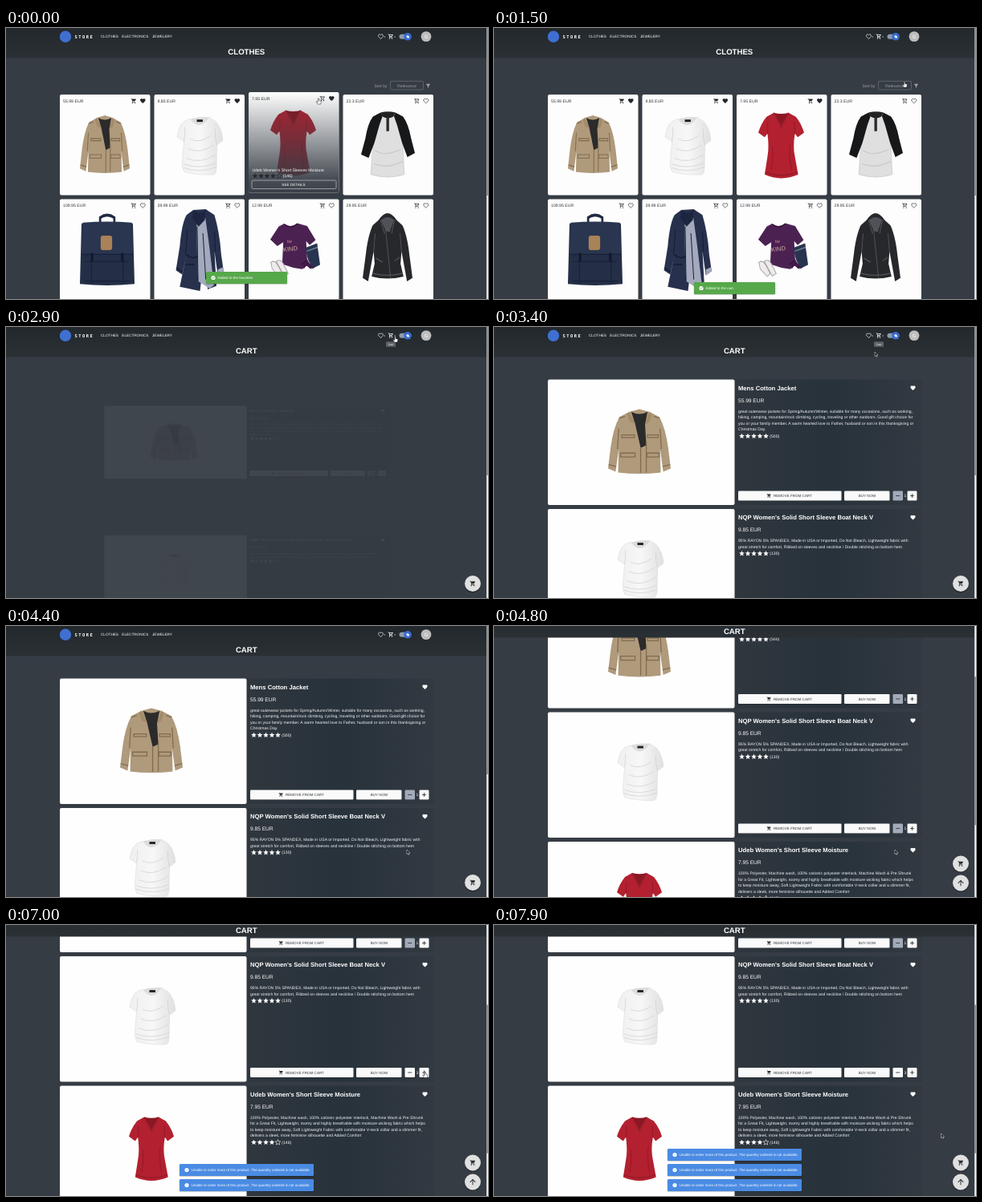
An HTML page for the animation above (8 s loop, 600x338 px).

```html
<!DOCTYPE html>
<html lang="en">
<head>
<meta charset="utf-8">
<title>Store</title>
<style>
html, body { margin: 0; width: 100%; height: 100%; overflow: hidden; background: #363c44; }
svg { display: block; width: 100%; height: 100%; }
text { font-family: "Liberation Sans", Arial, sans-serif; text-rendering: geometricPrecision; white-space: pre; }
.brand { font-family: "DejaVu Sans Mono", monospace; font-weight: 700; letter-spacing: 1.45px; }
.bold { font-weight: 700; }
.mid { text-anchor: middle; }
</style>
</head>
<body>
<svg id="stage" viewBox="0 0 600 338" preserveAspectRatio="none"></svg>
<script>
const LOOP = 8000, DARK = '#25282c', PITCH = 161.5;
const wheels = 'M7 18a2 2 0 1 0 0 4 2 2 0 0 0 0-4zM17 18a2 2 0 1 0 0 4 2 2 0 0 0 0-4z';
const icons = {
  cart: 'M1 2v2h2l3.6 7.6-1.4 2.4C4.5 15.4 5.5 17 7 17h12v-2H7l1.1-2h7.5c.7 0 1.4-.4 1.7-1L20.9 5.5A1 1 0 0 0 20 4H5.2l-.9-2z' + wheels,
  cartLine: 'M15.5 13c.8 0 1.4-.4 1.8-1L20.9 5.5A1 1 0 0 0 20 4H5.2l-.9-2H1v2h2l3.6 7.6-1.4 2.4C4.5 15.4 5.5 17 7 17h12v-2H7l1.1-2zM6.2 6h12.1l-2.8 5h-7z' + wheels,
  heart: 'M12 21.3l-1.5-1.3C5.4 15.4 2 12.3 2 8.5 2 5.4 4.4 3 7.5 3c1.7 0 3.4.8 4.5 2.1C13.1 3.8 14.8 3 16.5 3 19.6 3 22 5.4 22 8.5c0 3.8-3.4 6.9-8.5 11.5z',
  star: 'M12 17.3L18.2 21l-1.7-7L22 9.2l-7.2-.6L12 2 9.2 8.6 2 9.2 7.5 14l-1.7 7z',
  filter: 'M4 4h16v2l-6 7v8l-4-3v-5L4 6z',
  up: 'M4 12l1.4 1.4L11 7.8V20h2V7.8l5.6 5.6L20 12l-8-8z',
  check: 'M12 2a10 10 0 1 0 0 20 10 10 0 0 0 0-20zM10 17l-5-5 1.4-1.4L10 14.2l7.6-7.6L19 8z',
  info: 'M12 2a10 10 0 1 0 0 20 10 10 0 0 0 0-20zM11 7h2v2h-2zM11 11h2v6h-2z'
};

const path = (d, fill, more = '') => `<path d="${d}" fill="${fill}" ${more}/>`;
const line = (d, color, w) => path(d, 'none', `stroke="${color}" stroke-width="${w}"`);
const rect = (x, y, w, h, fill, rx = 0, more = '') =>
  `<rect x="${x}" y="${y}" width="${w}" height="${h}" fill="${fill}" rx="${rx}" ${more}/>`;
const disc = (x, y, r, fill) => `<circle cx="${x}" cy="${y}" r="${r}" fill="${fill}"/>`;
const text = (x, y, size, fill, s, cls = '', more = '') =>
  `<text x="${x}" y="${y}" font-size="${size}" fill="${fill}" class="${cls}" ${more}>${s}</text>`;
const group = (body, more = '') => `<g ${more}>${body}</g>`;
const icon = (name, x, y, size, fill, more = '') => path(icons[name], fill,
  `fill-rule="evenodd" transform="translate(${x} ${y}) scale(${size / 24}) translate(-12 -12)" ${more}`);
const heartLine = (x, y, color) => icon('heart', x, y, 7.2, 'none', `stroke="${color}" stroke-width="2.3"`);
const fade = (id, stops, dir = 'x2="0" y2="1"') => `<linearGradient id="${id}" ${dir}>` +
  stops.map(([at, color, alpha = 1]) => `<stop offset="${at}" stop-color="${color}" stop-opacity="${alpha}"/>`).join('') +
  '</linearGradient>';

// Garments, each drawn in a 100 by 100 box
const goods = {
  jacket: path('M34 4L50 0 66 4 82 12Q92 30 96 60L100 92 88 97 83 62 84 98Q50 102 16 98L17 62 12 97 0 92 4 60Q8 30 18 12Z', '#b09a7c') +
    path('M37 4Q50 11 63 4L59 24 61 56 52 60 43 22Z', '#2c2b2b') +
    path('M34 4L43 22 35 20 30 8ZM66 4L59 24 66 20 70 8Z', '#a38b69') +
    line('M52 60V98M61 50V98M17 30L15 62M83 30L85 62M22 40H42V44H22ZM63 40H80V44H63ZM20 68H43V74H20ZM62 68H81V74H62ZM1 86L13 89M99 86L87 89M18 14L27 11M82 14L73 11', '#816b4d', 1.6),
  blouse: path('M28 6Q48 26 70 3L84 10Q98 22 100 42L87 50 86 86Q86 98 80 100 45 101 15 95L11 84 15 44 0 36Q4 14 18 9Z', 'url(#cloth)', 'stroke="#dedede" stroke-width="1"') +
    path('M29 6Q48 2 70 3 50 28 29 6', '#dcdcdc') + rect(43, 7, 13, 4, '#222') +
    line('M15 44Q18 30 17 20M87 50Q82 36 83 22M14 82Q48 92 86 80M13 88Q50 98 86 87M20 72Q50 83 84 66M28 40Q50 48 74 34M24 56Q50 66 80 50', '#d2d2d2', 1.2),
  tee: path('M34 2L50 23 66 2 82 8Q94 18 100 32L86 39 80 33Q75 54 80 68L87 95Q50 106 14 95L20 68Q24 54 20 33L14 39 0 32Q6 18 18 8Z', '#b3202f') +
    path('M34 2Q50 5 66 2L50 23Z', '#8c1723') +
    line('M34 2L50 24 66 2M20 34L21 16M80 34L79 16M15 91Q50 101 86 91M30 52Q34 70 28 88M70 48Q66 70 73 88', '#92192a', 1.6),
  raglan: path('M36 5L64 5 77 40 80 96Q50 104 18 96L23 40Z', '#dfdfe0', 'stroke="#c8c8c8"') +
    path('M36 3L22 9Q12 20 8 42L0 66 14 71 25 48 34 22 40 8ZM64 3L78 9Q88 20 93 42L100 64 86 70 76 48 67 22 61 8Z', '#17181a') +
    path('M36 3Q50 0 64 3L60 9Q50 14 40 9Z', '#222') + rect(47, 10, 5, 21, '#2a2a2c') +
    line('M26 60Q45 70 74 58M24 80Q50 88 78 76', '#cacacc', 1.5),
  backpack: line('M37 14V5Q50 -2 63 5V14', '#202b44', 4) +
    path('M3 13H97L100 97Q50 101 0 97Z', '#242f47') +
    path('M5 12Q50 9 95 12L97 55H3Z', '#2a3650') + rect(38, 30, 21, 20, '#a98257', 3) +
    line('M3 56H97M21 56V97M79 56V97M10 66H90M8 93H92', '#18213a', 1.6) +
    path('M20 54h5v12h-5zM75 54h5v12h-5z', '#141b2e'),
  coat: path('M36 2L62 1 80 8Q91 30 94 56L99 76 87 81 80 52 84 94 66 98 58 60 50 100 8 95 22 56 13 80 0 75 8 46Q12 18 22 8Z', '#27304c') +
    path('M43 15L61 11 68 40 79 93 70 97 46 88 44 56Z', '#a4a9bd') + path('M36 2Q50 9 62 1L60 14 47 22 34 12Z', '#1d2540') +
    line('M22 56Q34 62 45 58M24 26L20 56M80 28L82 52M20 68H38M44 22L46 88M1 72L14 77M56 30L62 86', '#151c34', 1.6) + path('M87 74L98 71 99 76 87 81Z', '#a4a9bd'),
  knot: path('M28 3Q41 12 54 2L74 7 91 32 79 41 72 34 74 66 84 84 72 78 64 84Q44 82 24 75L26 36 14 43 0 31 17 8Z', '#4b2152') +
    line('M28 4Q41 14 54 3M73 68L62 76', '#371139', 2) +
    path('M70 46L94 38 100 76 85 83 76 68Z', '#28334f') + line('M73 52L95 45', '#77819a', 2) +
    path('M1 72Q10 66 17 80L24 92 18 97 4 84ZM12 70Q22 64 28 78L36 92 28 96Z', '#efebeb', 'stroke="#a9a4a8" stroke-width="1.5"') +
    path('M73 68L88 82 79 83 74 76 67 84 66 74Z', '#41194a'),
  leather: path('M32 10Q50 -10 68 10L80 18Q90 34 94 62L100 95 89 100 78 56 76 74 82 93Q50 99 18 93L24 74 22 56 11 100 0 95 6 62Q10 34 20 18Z', '#27282b') +
    path('M37 10Q50 2 63 10L54 28 46 26Z', '#515257') +
    line('M46 24L56 95M36 10L44 30M64 10L58 30M27 66L40 72M64 70L74 65M22 56L25 30M78 56L75 30M20 88Q50 94 80 88', '#54555a', 1.5)
};
const place = (name, x, y, w, h) => group(goods[name], `transform="translate(${x} ${y}) scale(${w / 100} ${h / 100})"`);

function stars(x, y, n, votes, fill) {
  let s = '';
  for (let i = 0; i < 5; i++)
    s += icon('star', x + 4 + i * 7.5, y, 8, i < n ? fill : 'none', `stroke="${fill}" stroke-width="${i < n ? 0 : 1.8}"`);
  return s + text(x + 38.8, y + 1.7, 5.1, '#fff', `(${votes})`);
}

// Shop page: name, x, y, w, h, price, chosen
const shelf = [
  ['jacket', 92, 109, 62, 72, '55.99', 1], ['blouse', 213, 109, 57, 74, '9.85', 1],
  ['tee', 329, 104, 57, 83, '7.95', 1], ['raglan', 442, 103, 67, 83, '22.3', 0],
  ['backpack', 92, 232, 68, 90, '109.95', 0], ['coat', 211.5, 225, 60, 103, '39.99', 0],
  ['knot', 329, 242, 62, 70, '12.99', 0], ['leather', 444, 231, 62, 85, '29.95', 0]
];
const hover = group(
  rect(302, 83, 112.5, 125.5, 'url(#shade)', 2) +
  text(306.5, 182, 5.15, '#fff', "Udeb Women's Short Sleeves Moisture") +
  stars(306, 187.5, 4, 146, DARK) +
  rect(306, 193, 105, 10.5, 'none', 1.5, 'stroke="#d5d7d9" stroke-width=".6"') +
  text(358, 200, 4.6, '#fff', 'SEE DETAILS', 'mid'), 'id="hover"');
const cards = shelf.map(([name, x, y, w, h, price, chosen], i) => {
  const left = 67 + (i % 4) * 117.5, top = i < 4 ? 83 : 213.5, cy = top + 8, hot = i == 2;
  return group(rect(left, top, 112.5, 125.5, '#fdfdfd', 2) + place(name, x, y, w, h) +
    (name == 'knot' ? text(350, 268, 5.5, '#d98a86', 'be') + text(345, 278, 7.5, '#d8b0a0', 'KIND', '', 'transform="rotate(-6 354 276)"') : '') +
    (hot ? hover : '') + text(left + 4, cy + 1.9, 5.2, '#30343a', price + ' EUR') +
    icon(chosen && !hot ? 'cart' : 'cartLine', left + 92, cy, 7.5, DARK, hot ? 'id="hotCart"' : '') +
    (chosen ? icon('heart', left + 103.3, cy, 7.8, DARK) : heartLine(left + 103.3, cy, DARK)),
    hot ? 'id="hot"' : '');
}).join('');
const shop = text(458.5, 73.5, 5.05, '#9a9fa5', 'Sort by') +
  rect(478.5, 66.3, 41, 10.7, 'none', 1.5, 'stroke="#767c84" stroke-width=".6"') +
  text(499, 73.5, 5.05, '#9a9fa5', 'Relevance', 'mid') + icon('filter', 525.5, 72, 7, '#a4a9af') + cards;

// Cart page
const items = [
  ['Mens Cotton Jacket', '55.99', 5, 500, ['jacket', 142, 37, 78, 80.5], [
    'great outerwear jackets for Spring/Autumn/Winter, suitable for many occasions, such as working,',
    'hiking, camping, mountain/rock climbing, cycling, traveling or other outdoors. Good gift choice for',
    'you or your family member. A warm hearted love to Father, husband or son in this thanksgiving or',
    'Christmas Day.']],
  ["NQP Women's Solid Short Sleeve Boat Neck V", '9.85', 5, 130, ['blouse', 154, 37, 57, 73], [
    '95% RAYON 5% SPANDEX, Made in USA or Imported, Do Not Bleach, Lightweight fabric with',
    'great stretch for comfort, Ribbed on sleeves and neckline / Double stitching on bottom hem']],
  ["Udeb Women's Short Sleeve Moisture", '7.95', 4, 146, ['tee', 153, 37.5, 56, 80.5], [
    '100% Polyester, Machine wash, 100% cationic polyester interlock, Machine Wash &amp; Pre Shrunk',
    'for a Great Fit, Lightweight, roomy and highly breathable with moisture wicking fabric which helps',
    'to keep moisture away, Soft Lightweight Fabric with comfortable V-neck collar and a slimmer fit,',
    'delivers a sleek, more feminine silhouette and Added Comfort']]
];
const button = (x, w, more) => rect(x, 139.5, w, 12, '#20262b', 1.2) + rect(x, 139, w, 12, '#fafafa', 1.2, more);
const cart = items.map(([name, price, rating, votes, good, lines], i) => group(
  rect(67, 0, 466, 156.5, 'url(#panel)', 2) + rect(67, 0, 232.5, 156.5, '#fefefe', 2) + place(...good) +
  text(304, 13.3, 7.65, '#fff', name, 'bold') + icon('heart', 521.5, 10.5, 7.5, '#fff') +
  text(304, 28.3, 6.6, '#fff', price + ' EUR') +
  lines.map((s, n) => text(304, 41.2 + n * 7.55, 5.08, '#f4f5f6', s)).join('') +
  stars(304.5, 40.3 + lines.length * 7.55, rating, votes, '#fff') +
  button(304, 128.5) + icon('cart', 342.3, 145, 6, DARK) + text(348, 146.7, 4.55, '#30343a', 'REMOVE FROM CART') +
  button(436, 56.5) + text(464.5, 146.7, 4.55, '#30343a', 'BUY NOW', 'mid') +
  button(496.5, 12.5, `id="less${i}"`) + line('M500.2 145H505.3', DARK, .8) +
  text(511.8, 146.9, 5, '#fff', '1', 'mid', `id="count${i}"`) +
  button(514.5, 12) + line('M518 145H523M520.5 142.5V147.5', DARK, .8), `id="item${i}"`)).join('');

const header = rect(0, -1, 600, 38.5, 'url(#bar)') + disc(74, 10.8, 7.2, '#3f6fd1') +
  text(85.6, 12.7, 5.4, '#fff', 'STORE', 'brand') +
  [[118, 'CLOTHES'], [144.3, 'ELECTRONICS'], [182, 'JEWELERY']].map(([x, s]) => text(x, 12.3, 4.65, '#fff', s)).join('') +
  heartLine(466.5, 10.7, '#fff') + text(470.5, 11.8, 3, '#fff', '3') +
  icon('cartLine', 479, 10.6, 7.5, '#fff') + text(483.2, 11.8, 3, '#fff', '2', '', 'id="badge"') +
  rect(489.5, 7.8, 14, 6, '#8d9bab', 3) + disc(500, 10.8, 4.8, '#3a6bd0') + path('M498 10.5l2-1.6 2.3 2.3-1.7 1.7z', '#fff') +
  disc(523, 10.6, 6.4, '#bdbdbd') + text(523, 12.8, 6, '#fff', 'G', 'mid') +
  text(299.3, 33.2, 9.65, '#fff', '', 'bold mid', 'id="title"') +
  group(rect(473, 18.2, 12, 6.6, '#5c6269', 1) + text(479, 22.8, 3.4, '#fff', 'Cart', 'mid'), 'id="tip"');

const fab = (id, name) => group(disc(0, .9, 10.3, '#24292e') + disc(0, 0, 10, '#e0e0e0') + icon(name, 0, 0, name == 'up' ? 11 : 8, DARK), `id="${id}"`);

// Toasts: start, end, x, width, colour, icon, message
const refusal = 'Unable to order more of this product. The quantity ordered is not available.';
const toasts = [
  [-900, 1000, 249, 101, '#57a84b', 'check', 'Added to the favorites'],
  [480, 2300, 249, 101, '#57a84b', 'check', 'Added to the cart.'],
  ...[6450, 6750, 7050].map(t => [t, 9000, 216, 167, '#4a8be3', 'info', refusal])
];
const toastMarkup = toasts.map(([, , x, w, color, mark, s], i) => group(
  rect(x - .3, .8, w + .6, 15, '#000', 1.5, 'opacity=".25"') + rect(x, 0, w, 15, color, 1.3) +
  icon(mark, x + 9, 7.5, 6.2, '#fff') + text(x + 14.5, 9.1, 4.5, '#fff', s), `id="toast${i}"`)).join('');

const pointer = group(path('M0 0V5.6L1.3 4.4 2.2 6.4 3.1 6 2.2 4.1H4Z', '#111', 'stroke="#fff" stroke-width=".45"'), 'id="arrow"') +
  group(path('M-.7 -3Q0 -3.8 .7 -3V-.6L2.8 0Q3.5 .3 3.3 1.3L2.7 4H-.8L-2.8 1.2Q-2.7 .3 -1.9 .7L-.7 1.6Z', '#fff', 'stroke="#111" stroke-width=".5"'), 'id="hand"');

document.getElementById('stage').innerHTML = '<defs>' +
  fade('bar', [[0, '#22282c'], [1, '#2a3034']]) +
  fade('cloth', [[0, '#efefef'], [.5, '#f7f7f7'], [1, '#e0e0e0']], '') +
  fade('shade', [[0, '#363c44', 0], [.12, '#363c44', .12], [.5, '#363c44', .52], [.85, '#363c44', .9], [1, '#363c44', .98]]) +
  fade('panel', [[.5, '#30373e'], [.75, '#27323b'], [1, '#323941']], '') + '</defs>' +
  rect(0, 0, 600, 338, '#363c44') + group(shop, 'id="shop"') + group(cart, 'id="cart"') +
  group(header, 'id="header"') + rect(598.2, 0, 1.8, 338, '#f1f1f1') + rect(598.2, 0, 1.8, 1, '#8a8c8e', 0, 'id="thumb"') +
  group(fab('cartFab', 'cart') + fab('upFab', 'up'), 'id="fabs"') + toastMarkup + group(pointer, 'id="pointer"');

const $ = id => document.getElementById(id);
const set = (id, name, value) => $(id).setAttribute(name, value);
const show = (id, on) => set(id, 'display', on ? 'inline' : 'none');
const move = (id, x, y, more = '') => set(id, 'transform', `translate(${x} ${y}) ${more}`);
const clamp = p => Math.max(0, Math.min(1, p));
const ease = p => (p = clamp(p), p * p * (3 - 2 * p));

// Pointer stops: time, x, y
const route = [[0, 389, 91], [700, 389, 91], [1300, 511, 70], [1700, 511, 70], [2450, 484.5, 15], [3000, 484.5, 15],
  [3350, 474, 31], [3700, 474, 31], [4300, 499, 279], [5100, 499, 279], [5500, 521.5, 186.5], [7150, 521.5, 186.5], [7650, 556.5, 260], [LOOP, 556.5, 260]];
const handTimes = [[0, 780], [1200, 1800], [2380, 3100], [5420, 7200]];

function drawToasts(t) {
  let lift = 13 * (1 - ease(t / 150));
  for (let i = toasts.length - 1; i >= 0; i--) {
    const [start, end] = toasts[i];
    const shown = ease((t - start) / 220) * (1 - ease((t - end) / 220));
    show('toast' + i, shown > 0);
    set('toast' + i, 'opacity', shown);
    move('toast' + i, 0, 317 - lift + 20 * (1 - shown));
    lift += 19 * shown;
  }
}

function draw(t) {
  const inCart = t >= 2800, over = 1 - ease((t - 850) / 250);
  const scroll = 188 * (1 - (1 - clamp((t - 4500) / 600)) ** 1.45);
  show('shop', !inCart);
  show('cart', inCart);
  show('fabs', inCart);
  $('title').textContent = inCart ? 'CART' : 'CLOTHES';

  set('hover', 'opacity', over);
  move('hot', 0, -3 * over);
  set('hotCart', 'd', t < 450 ? icons.cartLine : icons.cart);
  $('badge').textContent = t < 450 ? 2 : 3;

  const grown = ease((t - 2840) / 450), sx = .75 + .25 * grown;
  items.forEach((_, i) => {
    const top = 65.5 + PITCH * i;
    move('item' + i, 300, top + 78.25, `scale(${sx} ${sx * sx}) translate(-300 -78.25)`);
    set('item' + i, 'opacity', grown);
    const count = i == 1 ? 1 + (t >= 5700) + (t >= 6150) : 1;
    $('count' + i).textContent = count;
    set('less' + i, 'fill', count > 1 ? '#fafafa' : '#a3abb9');
  });
  move('cart', 0, -scroll);
  move('header', 0, -Math.min(scroll, 23));
  set('tip', 'opacity', ease((t - 2550) / 150) * (1 - ease((t - 3700) / 150)));
  set('thumb', 'y', scroll * .53);
  set('thumb', 'height', inCart ? 185 : 209);

  const raised = ease((t - 4550) / 200);
  move('cartFab', 581, 320 - 23.5 * raised);
  move('upFab', 581, 320.5, `scale(${raised})`);
  drawToasts(t);

  const k = Math.max(1, route.findIndex(p => p[0] > t));
  const [t0, x0, y0] = route[k - 1], [t1, x1, y1] = route[k], p = ease((t - t0) / (t1 - t0));
  const hand = handTimes.some(([from, to]) => t >= from && t < to);
  move('pointer', x0 + (x1 - x0) * p, y0 + (y1 - y0) * p);
  show('hand', hand);
  show('arrow', !hand);
}

const begin = performance.now();
function tick() {
  draw((performance.now() - begin) % LOOP);
  requestAnimationFrame(tick);
}
tick();
</script>
</body>
</html>
```
